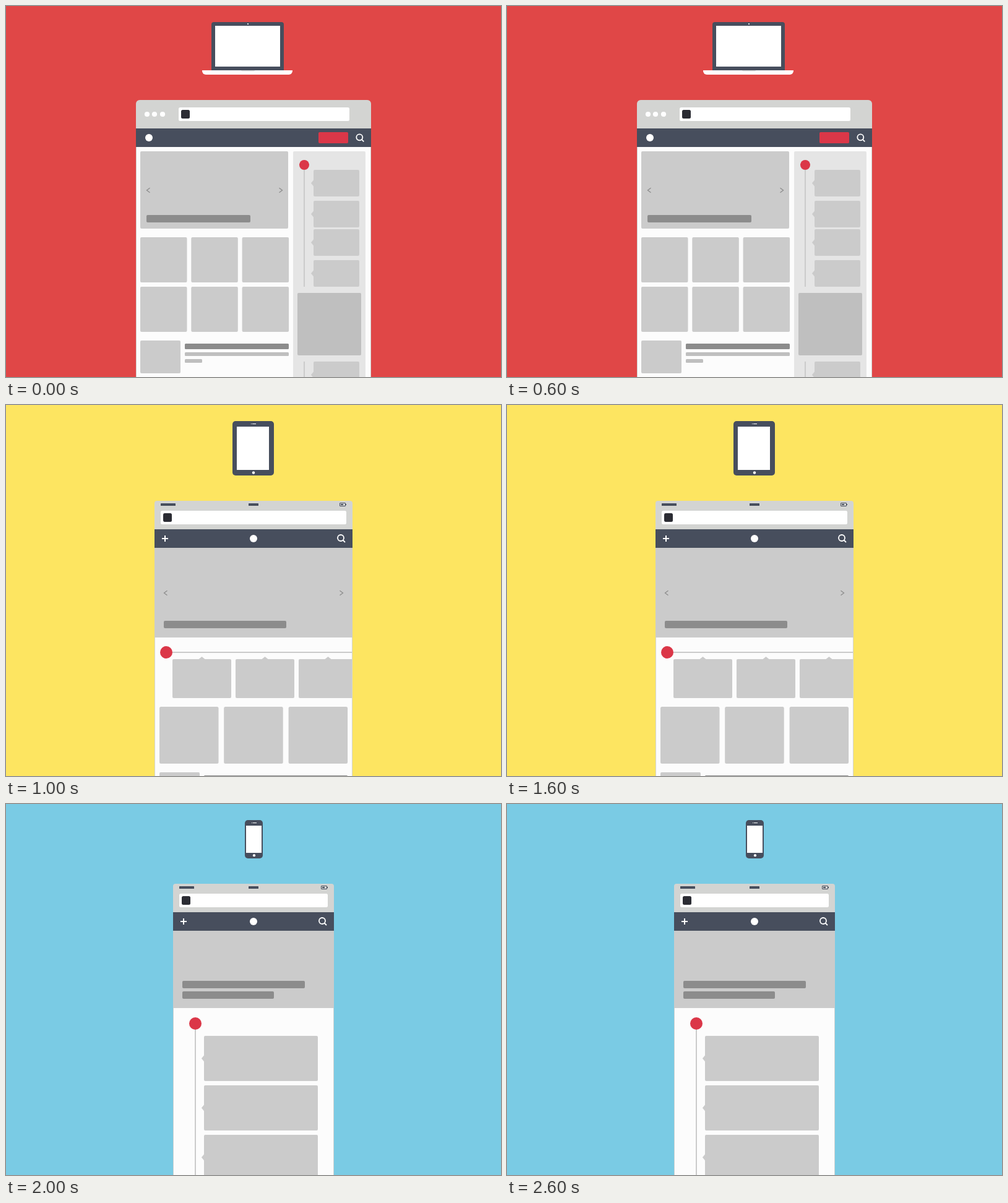
These frames come from a looping animation (800 by 600 pixels, 3000 ms). An HTML page:

```html
<!DOCTYPE html>
<html lang="en">
<head>
<meta charset="utf-8">
<title>Responsive layouts</title>
<style>
  html, body { margin: 0; width: 100%; height: 100%; overflow: hidden; }
  svg { display: block; }
  .scene { visibility: hidden; animation: show 3s step-end infinite; }
  .tablet { animation-delay: -2s; }
  .phone { animation-delay: -1s; }
  @keyframes show {
    0% { visibility: visible; }
    33.3333%, 100% { visibility: hidden; }
  }
  .navy { fill: #474e5d; }
  .white { fill: #fff; }
  .chrome { fill: #d3d4d2; }
  .page { fill: #fcfcfc; }
  .panel { fill: #e5e5e5; }
  .box { fill: #cbcbcb; }
  .ad { fill: #bfbfbf; }
  .text { fill: #8c8c8c; }
  .red { fill: #db3748; }
  .icon { fill: #2b2c33; }
  .arrow { fill: none; stroke: #8c8c8c; stroke-width: 1.3; }
  .line { fill: none; stroke: #fff; stroke-width: 1.8; }
</style>
</head>
<body>
<svg width="800" height="600" viewBox="0 0 800 600">
  <defs>
    <g id="search" class="line">
      <circle r="5"/>
      <path d="M3.5 3.5L7 7"/>
    </g>
    <path id="plus" d="M-5 0H5M0-5V5" stroke="#fff" stroke-width="2"/>
    <path id="prev" class="arrow" d="M5.5-3.7L.5 0l5 3.7"/>
    <path id="next" class="arrow" d="M-5.5-3.7L-.5 0l-5 3.7"/>
    <rect id="favicon" class="icon" width="14" height="14" rx="2.5"/>
    <circle id="logo" class="white" r="6"/>
    <g id="battery">
      <rect x=".5" y=".5" width="9" height="5" rx=".5" fill="none" stroke="#474e5d"/>
      <path class="navy" d="M2 2h4v2h-4zM10 2h1v2h-1z"/>
    </g>
    <g id="note">
      <rect width="74" height="43" rx="2"/>
      <path d="M0 16.5l-4 5 4 5z"/>
    </g>
    <g id="wide-note">
      <rect width="184" height="73" rx="2"/>
      <path d="M0 31.5l-4 5 4 5z"/>
    </g>
    <rect id="tile" width="75.5" height="73" rx="2"/>
    <rect id="big-tile" width="95.5" height="92" rx="2.5"/>
    <path id="tip" d="M-5 0l5-4 5 4z"/>
    <g id="status">
      <rect class="navy" x="10" y="4" width="24" height="4" rx=".5"/>
      <use href="#favicon" x="14" y="20"/>
      <use href="#plus" x="17" y="61"/>
    </g>
    <g id="status-mid">
      <rect class="navy" x="392" y="4" width="16" height="4" rx=".5"/>
      <use href="#logo" x="400" y="61"/>
    </g>
    <g id="status-end">
      <use href="#battery" x="-21" y="3"/>
      <use href="#search" x="-19" y="60"/>
    </g>
  </defs>

  <g class="scene laptop">
    <rect width="800" height="600" fill="#e04747"/>
    <path class="navy" d="M332 104V30a4 4 0 0 1 4-4h109a4 4 0 0 1 4 4v74z"/>
    <rect class="white" x="338" y="32" width="105" height="66"/>
    <circle class="white" cx="391" cy="29" r="1.1"/>
    <path class="white" d="M317 104h146v1a6 6 0 0 1-6 6H323a6 6 0 0 1-6-6z"/>
    <path class="panel" d="M380 104h22a2 2 0 0 1-2 2h-18a2 2 0 0 1-2-2z"/>

    <path class="chrome" d="M210 600V158a6 6 0 0 1 6-6h368a6 6 0 0 1 6 6v442z"/>
    <g class="white">
      <circle cx="228" cy="175" r="4.1"/>
      <circle cx="240" cy="175" r="4.1"/>
      <circle cx="253" cy="175" r="4.1"/>
      <rect x="279" y="164" width="276" height="22" rx="2.5"/>
    </g>
    <use href="#favicon" x="283" y="168"/>
    <rect class="page" x="211" y="228" width="378" height="372"/>
    <rect class="navy" x="210" y="198" width="380" height="30"/>
    <use href="#logo" x="231" y="213"/>
    <rect class="red" x="505" y="204" width="48" height="18" rx="2"/>
    <use href="#search" x="571.3" y="212.3"/>

    <rect class="box" x="217" y="235" width="239" height="125" rx="2"/>
    <use href="#prev" x="227" y="298"/>
    <use href="#next" x="447" y="298"/>
    <rect class="text" x="227" y="338" width="168" height="12" rx="2"/>
    <g class="box">
      <use href="#tile" x="217" y="374"/>
      <use href="#tile" x="299.3" y="374"/>
      <use href="#tile" x="381.6" y="374"/>
      <use href="#tile" x="217" y="454"/>
      <use href="#tile" x="299.3" y="454"/>
      <use href="#tile" x="381.6" y="454"/>
      <rect x="217" y="541" width="65" height="53" rx="2"/>
    </g>
    <rect class="text" x="289" y="546" width="168" height="9" rx="1.5"/>
    <rect class="ad" x="289" y="560" width="168" height="6" rx="1.5"/>
    <rect class="ad" x="289" y="571" width="28" height="6" rx="1.5"/>

    <path class="panel" d="M464 600V237a2 2 0 0 1 2-2h113a2 2 0 0 1 2 2v363z"/>
    <g class="box">
      <path d="M481 265h2v189h-2zM481 575h2v25h-2z"/>
      <use href="#note" x="497" y="265"/>
      <use href="#note" x="497" y="315"/>
      <use href="#note" x="497" y="361"/>
      <use href="#note" x="497" y="411"/>
      <use href="#note" x="497" y="575"/>
    </g>
    <circle class="red" cx="482" cy="257" r="8"/>
    <rect class="ad" x="471" y="464" width="103" height="101" rx="2"/>
  </g>

  <g class="scene tablet">
    <rect width="800" height="600" fill="#fde561"/>
    <rect class="navy" x="366" y="26" width="67" height="88" rx="5"/>
    <rect class="white" x="373" y="35" width="52" height="70"/>
    <path class="white" d="M396 30h1v1h-1zM398 30h6v1h-6z"/>
    <circle class="white" cx="400" cy="109.5" r="2.2"/>

    <path class="chrome" d="M240 600V159a4 4 0 0 1 4-4h312a4 4 0 0 1 4 4v441z"/>
    <rect class="white" x="250" y="171" width="300" height="22" rx="2.5"/>
    <rect class="navy" x="240" y="201" width="320" height="30"/>
    <use href="#status" x="240" y="155"/>
    <use href="#status-mid" y="155"/>
    <use href="#status-end" x="560" y="155"/>

    <rect class="box" x="240" y="231" width="320" height="145"/>
    <use href="#prev" x="255" y="304"/>
    <use href="#next" x="545" y="304"/>
    <rect class="text" x="255" y="349" width="198" height="12" rx="2"/>
    <rect class="page" x="241" y="376" width="318" height="224"/>
    <g class="box">
      <rect x="269" y="399" width="290" height="2"/>
      <rect x="269" y="411" width="95" height="63" rx="2"/>
      <rect x="371" y="411" width="95" height="63" rx="2"/>
      <path d="M559 411h-84a2 2 0 0 0-2 2v59a2 2 0 0 0 2 2h84z"/>
      <use href="#tip" x="316.5" y="411"/>
      <use href="#tip" x="418.5" y="411"/>
      <use href="#tip" x="520.5" y="411"/>
      <use href="#big-tile" x="248" y="488"/>
      <use href="#big-tile" x="352.2" y="488"/>
      <use href="#big-tile" x="456.6" y="488"/>
      <rect x="248" y="594" width="65" height="53" rx="2"/>
    </g>
    <circle class="red" cx="259" cy="400" r="10"/>
    <rect class="text" x="320" y="599" width="232" height="9" rx="1.5"/>
  </g>

  <g class="scene phone">
    <rect width="800" height="600" fill="#7acbe4"/>
    <rect class="navy" x="386" y="26" width="29" height="62" rx="5"/>
    <rect class="white" x="388" y="35" width="25" height="44"/>
    <path class="white" d="M397 30h1v1h-1zM399 30h6v1h-6z"/>
    <circle class="white" cx="401" cy="83.2" r="2.1"/>

    <path class="chrome" d="M270 600V133a4 4 0 0 1 4-4h252a4 4 0 0 1 4 4v467z"/>
    <rect class="white" x="280" y="145" width="240" height="22" rx="2.5"/>
    <rect class="navy" x="270" y="175" width="260" height="30"/>
    <use href="#status" x="270" y="129"/>
    <use href="#status-mid" y="129"/>
    <use href="#status-end" x="530" y="129"/>

    <rect class="box" x="270" y="205" width="260" height="125"/>
    <rect class="text" x="285" y="286" width="198" height="12" rx="2"/>
    <rect class="text" x="285" y="303" width="148" height="12" rx="2"/>
    <rect class="page" x="271" y="330" width="258" height="270"/>
    <g class="box">
      <rect x="305" y="365" width="2" height="235"/>
      <use href="#wide-note" x="320" y="375"/>
      <use href="#wide-note" x="320" y="455"/>
      <use href="#wide-note" x="320" y="535"/>
    </g>
    <circle class="red" cx="306" cy="355" r="10"/>
  </g>
</svg>
</body>
</html>
```
